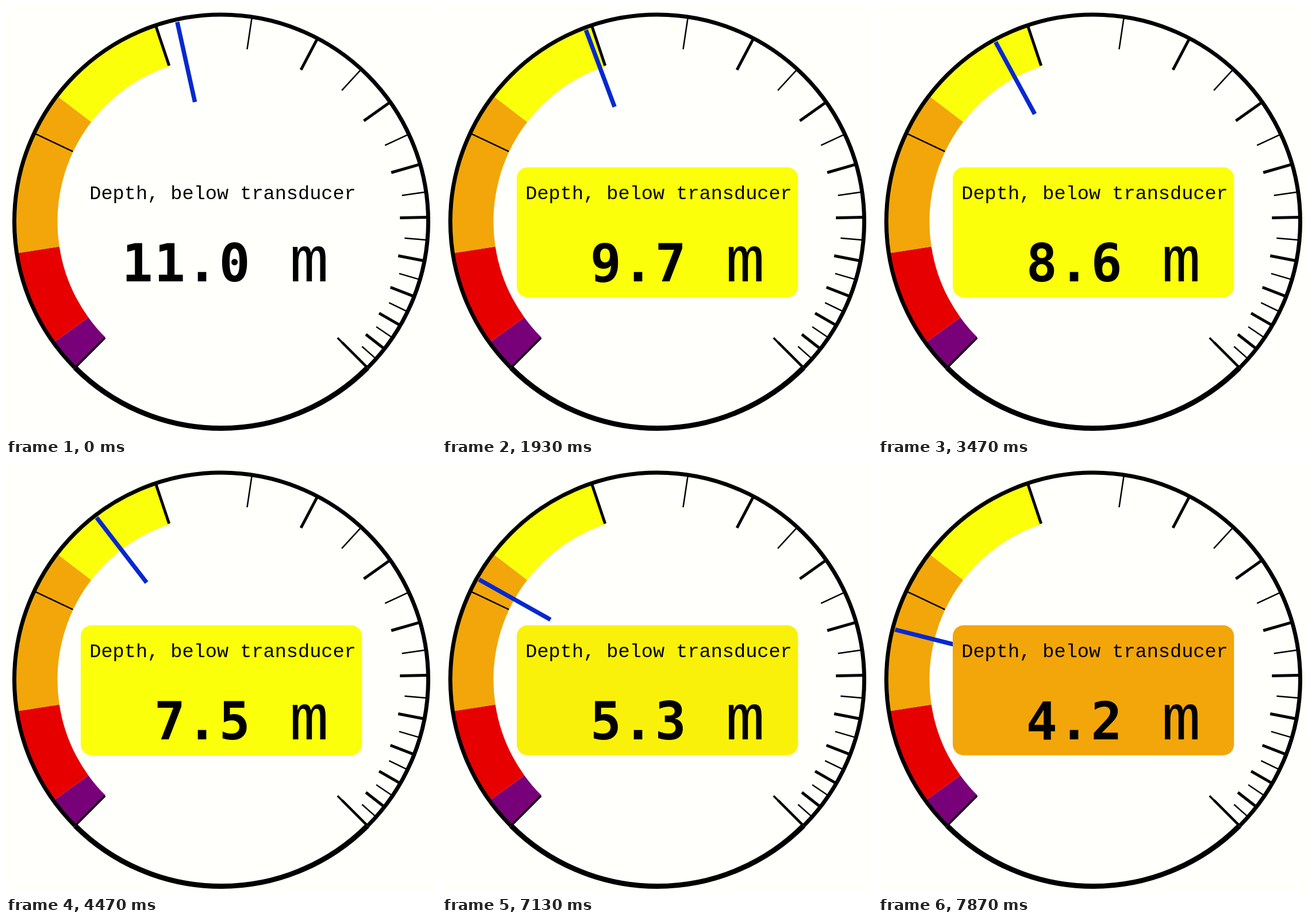
Recreate the animation shown at these times as an HTML page. Size 748 by 748 pixels, loop 8000 ms.

```html
<!DOCTYPE html>
<html lang="en">
<head>
<meta charset="utf-8">
<title>Depth gauge</title>
<style>
  html, body { margin: 0; width: 100%; height: 100%; overflow: hidden; background: #fffffc; }
  svg { display: block; width: 100%; height: 100%; }
  .label { font: 33.6px "Liberation Mono", monospace; }
  .value { font: bold 90px "DejaVu Sans Mono", monospace; letter-spacing: 2.1px; text-anchor: end; }
  .unit { font: 114px "Liberation Mono", monospace; text-anchor: middle; }
</style>
</head>
<body>
<svg viewBox="0 0 748 748">
  <g id="dial" transform="translate(374.5 375)" fill="none"></g>
  <g transform="translate(374.5 375)">
    <line id="needle" y1="-355.5" y2="-213" stroke="#0528d0" stroke-width="7.5"/>
  </g>
  <rect id="panel" x="130" y="280.5" width="489.3" height="226.3" rx="19"/>
  <text class="label" x="145.3" y="336">Depth, below transducer</text>
  <text class="value" id="value" x="426.7" y="479"></text>
  <text class="unit" x="527.5" y="479">m</text>
</svg>
<script>
const LOOP = 8000, MOVE = 310;
const YELLOW = [251, 255, 10], ORANGE = [242, 166, 10];
const rgb = c => `rgb(${c.map(Math.round)})`;
const $ = id => document.getElementById(id);
const dial = $('dial');

// Logarithmic scale, in degrees clockwise from the top.
const angleOf = depth => -18.5 + 153.5 * Math.log10(depth / 10);

function draw(tag, attributes) {
  const node = document.createElementNS('http://www.w3.org/2000/svg', tag);
  for (const name in attributes) node.setAttribute(name, attributes[name]);
  dial.append(node);
}

function point(angle, radius) {
  const a = angle * Math.PI / 180;
  return `${radius * Math.sin(a)} ${-radius * Math.cos(a)}`;
}

function arc(from, to, radius, width, stroke) {
  const large = to - from > 180 ? 1 : 0;
  draw('path', {
    d: `M${point(from, radius)}A${radius} ${radius} 0 ${large} 1 ${point(to, radius)}`,
    stroke, 'stroke-width': width
  });
}

function tick(angle, length, width) {
  draw('line', {
    y1: -358, y2: length - 357, stroke: '#000', 'stroke-width': width,
    transform: `rotate(${angle})`
  });
}

const zoneEnds = [-135, ...[2, 3, 6, 10].map(angleOf)];
['#780078', '#e60000', rgb(ORANGE), rgb(YELLOW)].forEach((color, i) =>
  arc(zoneEnds[i], zoneEnds[i + 1], 321, 72, color));

tick(-135, 71, 3.5);
tick(angleOf(5), 71.5, 2.5);
tick(angleOf(10), 71, 5);
for (let depth = 15; depth < 100; depth += 5) {
  const a = angleOf(depth);
  if (depth % 10) tick(a, 55.6 - 0.197 * a, 2.5);
  else tick(a, 64.8 - 0.21 * a, 5);
}
tick(135, 71, 3.5);
tick(135, 60, 4.5);

arc(-135, 135, 360, 7, '#000');
arc(135, 225, 359.5, 9, '#000');

// Start time and depth of each reading.
const readings = [
  [-1000, 10.951], [380, 10.76], [1600, 9.715], [2920, 8.6],
  [4060, 7.51], [5390, 6.41], [6660, 5.31], [7590, 4.205]
];

const progress = (t, start, duration) => Math.min(1, Math.max(0, (t - start) / duration));
const smooth = x => x * x * (3 - 2 * x);
const mix = (a, b, x) => a + (b - a) * x;

function render(t) {
  const index = readings.findLastIndex(([start]) => start <= t);
  const [start, depth] = readings[index];
  const previous = readings[Math.max(0, index - 1)][1];
  const angle = mix(angleOf(previous), angleOf(depth), smooth(progress(t, start, MOVE)));
  $('needle').setAttribute('transform', `rotate(${angle})`);
  $('value').textContent = depth.toFixed(1);

  const warmth = smooth(progress(t, 7020, 440));
  $('panel').setAttribute('fill', rgb(YELLOW.map((c, i) => mix(c, ORANGE[i], warmth))));
  $('panel').setAttribute('opacity', smooth(progress(t, 1600, 340)));
}

const origin = performance.now();
function frame() {
  render((performance.now() - origin) % LOOP);
  requestAnimationFrame(frame);
}
frame();
</script>
</body>
</html>
```
